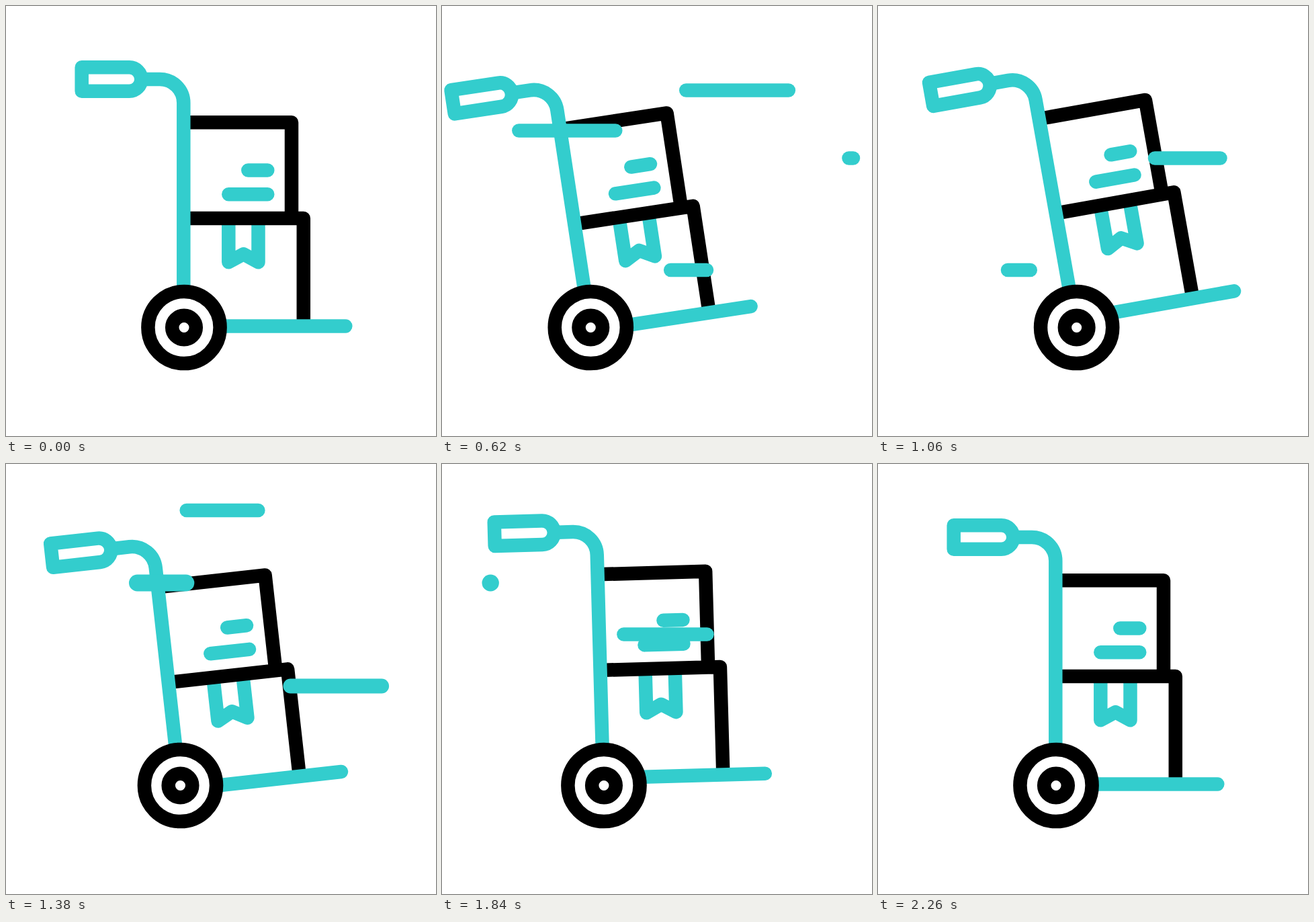
Animation of 640 by 640 pixels, one loop 2.4 s. Source, as an HTML page:

```html
<!DOCTYPE html>
<html lang="en">
<head>
<meta charset="utf-8">
<title>Hand truck</title>
<style>
  html, body { margin: 0; width: 100%; height: 100%; overflow: hidden; background: #fff; }
  svg { display: block; width: 100vw; height: 100vh; }
  path, circle { fill: none; stroke-width: 20.5; stroke-linejoin: round; }
  .teal { stroke: #33cdcd; }
  .ink { stroke: #000; }
  .round { stroke-linecap: round; }
</style>
</head>
<body>
<svg viewBox="0 0 640 640">
  <g id="body">
    <path class="teal" d="M331.3 316V381.3L353.5 369.3L375.5 381.3V316"/>
    <path class="teal round" d="M360.3 244.5H389.3M331.3 280.3H389.3"/>
    <path class="ink" d="M264.3 173.3H425V316M264.3 316H442.8V474"/>
    <path class="teal round" d="M275 476.5H505.3"/>
    <path class="teal" d="M205 109H229A35.3 35.3 0 0 1 264.3 144.3V474"/>
    <path class="teal" d="M112.7 91.2H183.5A17.8 17.8 0 0 1 183.5 126.8H112.7Z"/>
  </g>
  <g id="wheel">
    <circle class="ink" cx="265" cy="478.5" r="53.6" style="fill:#fff"/>
    <circle class="ink" cx="265" cy="478.5" r="17.8"/>
  </g>
  <g id="dashes"></g>
</svg>
<script>
const LOOP = 2400, STEP = 20;
const SWEEP = 480;

const body = document.getElementById("body");
const wheel = document.getElementById("wheel");
const layer = document.getElementById("dashes");

// Key poses: [ms, value]
const roll = [[0, 0], [580, -45.1], [1080, 31], [1630, -33.3], [2235, 0]];
const bob = [[0, 0], [450, 10.5], [1080, -10.3], [1450, 10], [1850, -9.2], [2200, 0]];
const tilt = [[0, 0], [620, 8.65], [950, 10.6], [1380, 6.35], [2150, 0]];

// A wind line: its head sweeps left, its tail follows after lag
function dash({ y, from, length, start, lag = 248, width = 20.5 }) {
  const el = document.createElementNS("http://www.w3.org/2000/svg", "path");
  el.setAttribute("class", "teal round");
  el.style.strokeWidth = width;
  layer.append(el);
  const at = ms => from - length * smooth(ms / SWEEP);
  return t => {
    const age = t - start;
    el.style.display = age > 0 && age < SWEEP + lag ? "" : "none";
    el.setAttribute("d", `M${at(age - lag)} ${y}H${at(age) - 0.01}`);
  };
}

const dashes = [
  { y: 125.5, from: 555, length: 217, start: 242 },
  { y: 185.5, from: 266, length: 220, start: 318 },
  { y: 393, from: 394, length: 201, start: 457 },
  { y: 226.5, from: 612, length: 200, start: 568 },
  { y: 69, from: 377, length: 178, start: 1105 },
  { y: 330.5, from: 560.5, length: 231, start: 1110, width: 22 },
  { y: 177, from: 268, length: 196, start: 1182, lag: 190, width: 25 },
  { y: 253.5, from: 403, length: 186, start: 1530 }
].map(dash);

function smooth(u) {
  u = Math.min(1, Math.max(0, u));
  return u * u * (3 - 2 * u);
}

const secant = (keys, i) =>
  keys[i] && keys[i + 1] ? (keys[i + 1][1] - keys[i][1]) / (keys[i + 1][0] - keys[i][0]) : 0;

// Flat at turning points, harmonic mean elsewhere
function slope(keys, i) {
  const a = secant(keys, i - 1), b = secant(keys, i);
  return a * b > 0 ? 2 * a * b / (a + b) : 0;
}

function sample(keys, t) {
  const i = keys.findIndex((k, n) => keys[n + 1] && t < keys[n + 1][0]);
  if (i < 0) return keys[keys.length - 1][1];
  const [t0, v0] = keys[i], [t1, v1] = keys[i + 1];
  const h = t1 - t0, u = (t - t0) / h, w = 1 - u;
  return v0 + (v1 - v0) * smooth(u)
    + h * u * w * (w * slope(keys, i) - u * slope(keys, i + 1));
}

function draw(t) {
  const move = `translate(${sample(roll, t)} 0)`;
  wheel.setAttribute("transform", move);
  // The load slides along the leaning pole
  body.setAttribute("transform",
    `${move} rotate(${-sample(tilt, t)} 265 478.5) translate(0 ${sample(bob, t)})`);
  dashes.forEach(drawDash => drawDash(t));
}

function tick() {
  const t = performance.now() % LOOP;
  draw(Math.floor(t / STEP) * STEP);
  requestAnimationFrame(tick);
}
tick();
</script>
</body>
</html>
```
